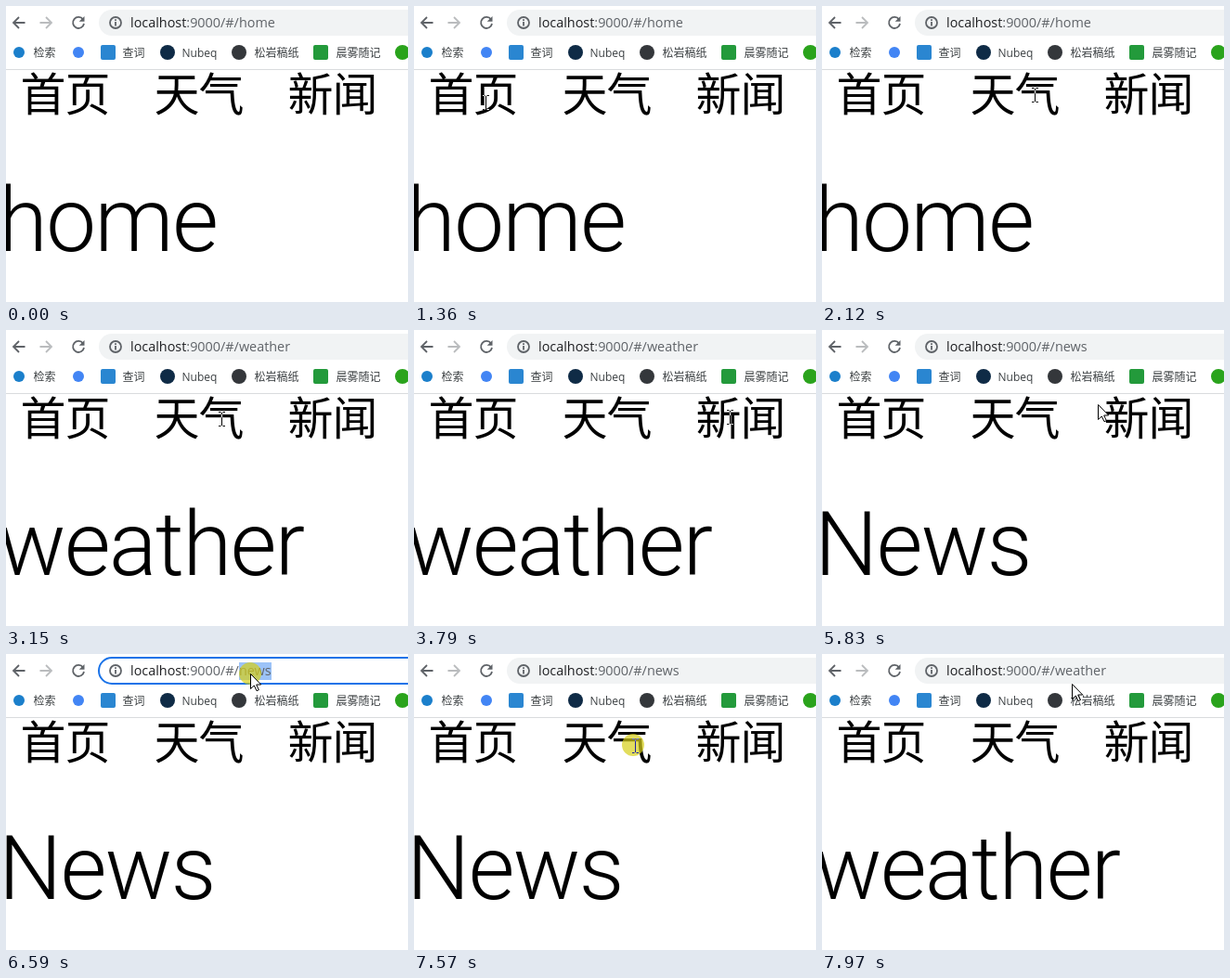
An HTML page that plays this animation: 433 by 319 pixels, repeating every 8000 ms.

```html
<!DOCTYPE html>
<html lang="zh-CN">
<head>
<meta charset="utf-8">
<title>Hash routing demo</title>
<style>
  html, body { margin: 0; height: 100%; overflow: hidden; background: #fff; }
  svg { display: block; width: 100vw; height: 100vh; }
  .url { font: 14.4px "Open Sans", "Noto Sans", sans-serif; fill: #5f6368; }
  .host { fill: #202124; }
  .marks {
    display: flex; align-items: center; gap: 8px; height: 32px; white-space: nowrap;
    font: 12px "Open Sans", "Noto Sans CJK SC", "Noto Sans CJK", sans-serif; color: #3c4043;
  }
  .marks i { flex: none; width: 16px; height: 16px; border-radius: 50%; }
  .marks .square { border-radius: 2px; }
  .marks .small { transform: scale(.75); }
  .marks span { margin-right: 8px; }
  .nav { font: 49px "Noto Sans CJK SC", "Noto Sans CJK", sans-serif; letter-spacing: -1px; }
  .title { font: 300 96px Roboto, sans-serif; letter-spacing: -1.5px; }
  .icon { fill: none; stroke: #5f6368; stroke-width: 1.8; }
  #ibeam { fill: none; stroke: #fff; mix-blend-mode: difference; }
</style>
</head>
<body>
<svg viewBox="0 0 433 319">
  <rect width="433" height="319" fill="#fff"/>

  <g class="icon">
    <path d="M20.5 18H8.5M14 12L8 18L14 24"/>
    <path d="M36.5 18H48.5M43 12L49 18L43 24" stroke="#babcbe"/>
    <path d="M83 14.5A6 6 0 1 0 84 19"/>
    <path d="M84.5 11V16.8H78.7Z" fill="#5f6368" stroke="none"/>
  </g>
  <rect id="bar" x="100" y="4" width="360" height="28" rx="14" stroke-width="2"/>
  <g class="icon">
    <circle cx="118" cy="18" r="6"/>
    <path d="M118 17V21.5M118 14.3V15.9"/>
  </g>
  <rect id="selection" x="251" y="9" width="35" height="19" fill="#9cc3f8"/>
  <text class="url" x="134" y="23"><tspan class="host">localhost</tspan>:9000/#/<tspan id="route"></tspan></text>

  <foreignObject x="5.5" y="34" width="440" height="32">
    <div class="marks">
      <i class="small" style="background:#1b7fcb"></i><span>检索</span>
      <i class="small" style="background:#4285f4; margin-right:8px"></i>
      <i class="square" style="background:#2a86d1"></i><span>查词</span>
      <i style="background:#0f2b46"></i><span>Nubeq</span>
      <i style="background:#34373b"></i><span>松岩稿纸</span>
      <i class="square" style="background:#239a3b"></i><span>晨雾随记</span>
      <i style="background:#2aa31c"></i>
    </div>
  </foreignObject>
  <path d="M0 68.5H433" stroke="#d9dbde"/>

  <g id="nav" class="nav"></g>
  <text id="title" class="title" x="-8" y="264"></text>

  <circle id="click" r="12" fill="#d5cf18" opacity=".7"/>
  <path id="arrow" d="M.5.5V16.5L4.3 13L7 18.7L9.3 17.7L6.7 12H11.7Z" fill="#fff" stroke="#000"/>
  <path id="ibeam" d="M-1 -6.5H1.5M3.5 -6.5H6M2.5 -6V8M-1 8.5H1.5M3.5 8.5H6"/>
</svg>
<script>
const LOOP = 8000, RENDER_DELAY = 30;
const LINK_SIZE = 48, LINK_LEFT = 16, LINK_STEP = 3 * LINK_SIZE;
const links = ["首页", "天气", "新闻"];
const titles = { home: "home", weather: "weather", news: "News" };

// Places where the pointer rests or turns; it glides evenly from one to the next.
const stops = [
  { x: 382, y: 144, leave: 1000 },
  { x: 75, y: 103, arrive: 1360, leave: 1880 },
  { x: 227, y: 95, arrive: 2120, leave: 3132 },
  { x: 348, y: 93, arrive: 3850, leave: 5320 },
  { x: 297, y: 80, arrive: 5830 },
  { x: 243, y: 34, arrive: 6140 },
  { x: 263, y: 21, arrive: 6400, leave: 6720 },
  { x: 259, y: 54, arrive: 6970 },
  { x: 236, y: 98, arrive: 7160, leave: 7740 },
  { x: 269, y: 32, arrive: 7970 }
];
const clicks = [
  { down: 1490, up: 1630, route: "home" },
  { down: 2520, up: 2680, route: "weather" },
  { down: 4470, up: 4540, route: "news" },
  { down: 6440, up: 6510 },
  { down: 6580, up: 6690 },
  { down: 7570, up: 7690, route: "weather" }
];
const [focusClick, selectClick, blurClick] = clicks.slice(-3);

const el = id => document.getElementById(id);
const within = (value, from, to) => value >= from && value < to;
const show = (id, on) => el(id).setAttribute("visibility", on ? "visible" : "hidden");
const linkX = i => LINK_LEFT + i * LINK_STEP;
const routeAt = t => clicks.findLast(c => c.route && c.up <= t)?.route ?? "home";

function pointerAt(t) {
  const i = stops.findLastIndex(stop => (stop.arrive ?? 0) <= t);
  const from = stops[i], to = stops[i + 1] ?? from;
  const leave = from.leave ?? from.arrive;
  const k = to === from ? 0 : Math.max(0, (t - leave) / (to.arrive - leave));
  return ["x", "y"].map(axis => Math.round(from[axis] + (to[axis] - from[axis]) * k));
}

function draw(t) {
  el("route").textContent = routeAt(t);
  el("title").textContent = titles[routeAt(t - RENDER_DELAY)];

  const focused = within(t, focusClick.down, blurClick.down);
  el("bar").setAttribute("fill", focused ? "#fff" : "#f1f3f4");
  el("bar").setAttribute("stroke", focused ? "#1a73e8" : "none");
  show("selection", within(t, selectClick.down, blurClick.down));

  const [x, y] = pointerAt(t);
  const visible = t >= stops[0].leave;
  const overText = within(y, 71, 119)
    && links.some((_, i) => within(x, linkX(i), linkX(i) + 2 * LINK_SIZE));
  for (const id of ["click", "arrow", "ibeam"]) {
    el(id).setAttribute("transform", `translate(${x} ${y})`);
  }
  show("click", clicks.some(c => within(t, c.down, c.up)));
  show("arrow", visible && !overText);
  show("ibeam", visible && overText);
}

el("nav").innerHTML = links
  .map((label, i) => `<text x="${linkX(i) - 0.5}" y="112.5">${label}</text>`).join("");

const start = performance.now();
function frame() {
  draw((performance.now() - start) % LOOP);
  requestAnimationFrame(frame);
}
frame();
</script>
</body>
</html>
```
